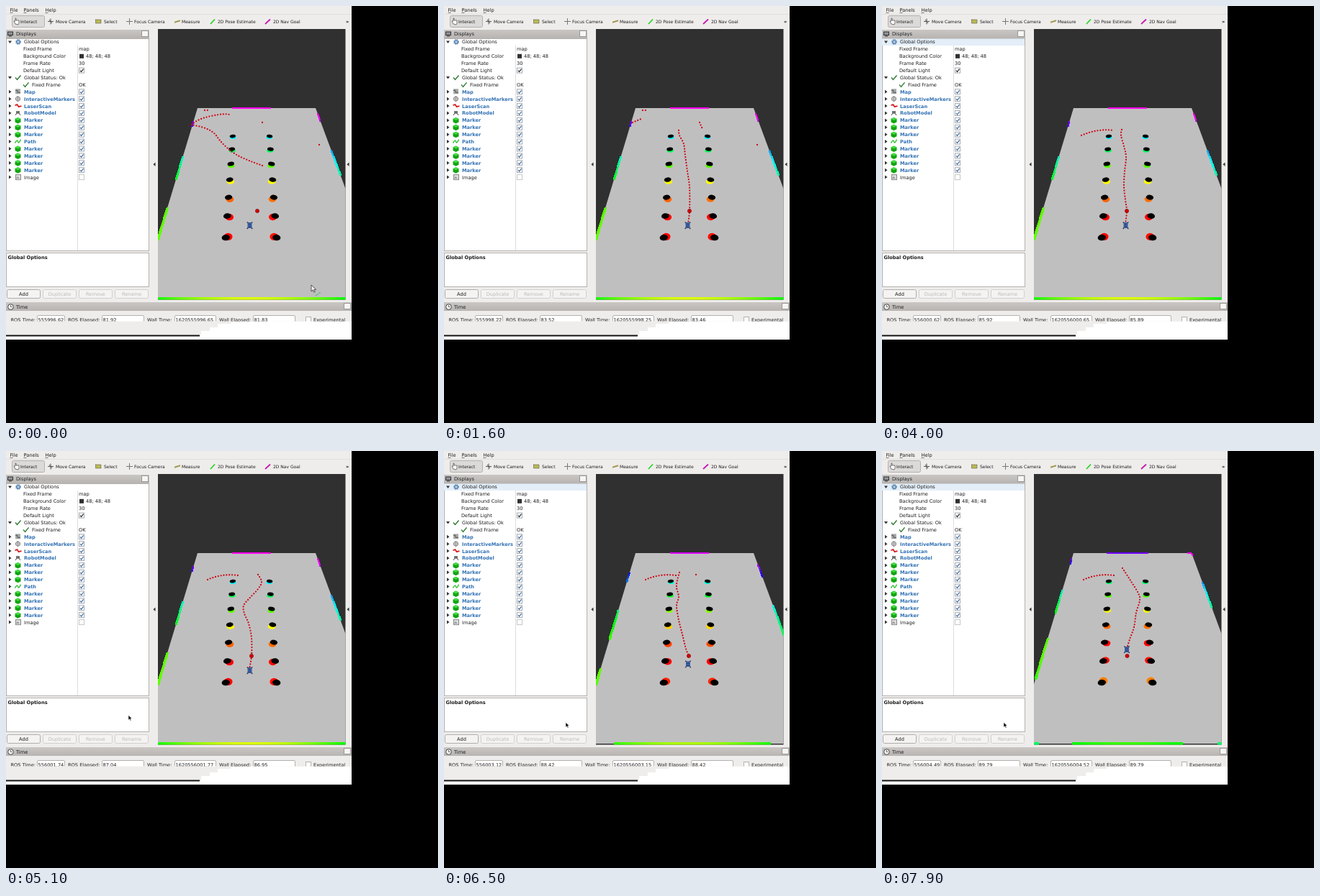
These frames come from a looping animation (600x580 px, 8000 ms). An HTML page:

```html
<!DOCTYPE html>
<html lang="en">
<head>
<meta charset="utf-8">
<title>Path planner view</title>
<style>
html, body { margin: 0; width: 100%; height: 100%; overflow: hidden; background: #000; }
svg { display: block; }
text { font: 6.64px "DejaVu Sans", sans-serif; white-space: pre; }
.bold { font-weight: bold; }
.tool { font-size: 6px; }
</style>
</head>
<body>
<svg id="stage" width="600" height="580" viewBox="0 0 600 580">
  <defs>
    <clipPath id="viewClip"><rect x="211" y="32" width="260.5" height="376.5"/></clipPath>
    <clipPath id="timeClip"><rect x="0" y="424" width="480" height="14.8"/></clipPath>
    <linearGradient id="header" x2="0" y2="1"><stop stop-color="#c9c6c4"/><stop offset="1" stop-color="#b7b4b2"/></linearGradient>
  </defs>
  <rect width="480" height="464" fill="#efedeb"/>
  <g id="chrome"></g>
  <g clip-path="url(#viewClip)">
    <rect x="211" y="32" width="261" height="377" fill="#303030"/>
    <path d="M266 142H430L528 407H186Z" fill="#c0bfc0"/>
    <g id="scan" shape-rendering="crispEdges"></g>
    <g id="cones"></g>
    <g fill="none" stroke="#cc0814" stroke-width="2.3" stroke-linecap="round" stroke-dasharray="0 3.9">
      <path id="stale"/><path id="route"/>
    </g>
    <circle id="goal" cy="285" r="2.6" fill="#d40000" stroke="#7a0808" stroke-width=".6"/>
    <g id="robot">
      <path d="M-3.8-4.6L-2-3H2L3.8-4.6M-3.8 5L-2 3H2L3.8 5" fill="none" stroke="#26364f" stroke-width="1.3"/>
      <rect x="-3" y="-3.6" width="6" height="7.4" rx="1" fill="#3d62a5"/>
      <path d="M-2-1H2M-2 2H2" stroke="#253c6b" stroke-width=".9"/>
    </g>
    <path id="glint" d="M430 403L437 398" stroke="#35c878" stroke-width="1.5" stroke-dasharray="2 1"/>
  </g>
  <path id="cursor" d="M0 0V9L2.2 7L3.7 10.2L5.2 9.5L3.7 6.4H6.6Z" stroke-width=".7"/>
</svg>
<script>
const LOOP = 8000, STEP = 100;
const $ = id => document.getElementById(id);
const chrome = $('chrome');

function el(tag, attrs, parent = chrome) {
  const node = document.createElementNS('http://www.w3.org/2000/svg', tag);
  for (const key in attrs) node.setAttribute(key, attrs[key]);
  return parent.appendChild(node);
}
const rect = (x, y, width, height, fill, more, parent) => el('rect', { x, y, width, height, fill, ...more }, parent);
const path = (d, more) => el('path', { d, fill: 'none', ...more });
function text(x, y, content, more, parent) {
  const node = el('text', { x, y, fill: '#1c1c1c', ...more }, parent);
  node.textContent = content;
  return node;
}
const frame = (x, y, w, h, fill = '#fff', stroke = '#b4b1af', rx = 0) =>
  rect(x + .5, y + .5, w - 1, h - 1, fill, { stroke, rx });

// Menu and toolbar
[['File', 5.5], ['Panels', 24.5], ['Help', 54.5]].forEach(([name, x]) => {
  text(x, 7.8, name);
  rect(x, 9, 4, .6, '#333');
});
rect(0, 11, 480, .7, '#dbd9d7');
frame(8, 13, 46, 17, '#dcdad8', '#b3b0ae', 2);
path('M13 25L11 21L13 21V17H14V20H18V24L17 26Z', { fill: '#fff', stroke: '#555', 'stroke-width': .8 });
path('M58 21.5H66M62 17.5V25.5M60 19L64 24', { stroke: '#555' });
rect(124.5, 19, 7.5, 5, '#b9bb4f', { stroke: '#444', 'stroke-dasharray': '1 1' });
path('M167 21.5H176M171.5 17V26', { stroke: '#777' });
path('M234 22.8L242 20.2', { stroke: '#a39a55', 'stroke-width': 2 });
path('M284 25L290 18.5', { stroke: '#25d625', 'stroke-width': 1.8 });
path('M360 25L367 18.5', { stroke: '#c41cb0', 'stroke-width': 1.8 });
[['Interact', 20], ['Move Camera', 69], ['Select', 136], ['Focus Camera', 178], ['Measure', 244],
 ['2D Pose Estimate', 294], ['2D Nav Goal', 371]].forEach(([name, x]) => text(x, 23.9, name, { class: 'tool' }));
text(472, 24, '»', { class: 'bold' });

// Displays panel
rect(0, 33, 199, 12, 'url(#header)');
rect(2, 35.5, 8, 5.5, '#333');
rect(3, 36.5, 6, 3.5, '#8d9298');
rect(4, 41.5, 4, 1, '#333');
text(14, 41.4, 'Displays');
frame(188, 34, 10, 9, '#f7f6f5', '#9a9896');
frame(0, 45, 199, 296);
const hover = rect(0, 45.5, 198, 9.5, '#e3eef8');
rect(99, 55, .8, 285, '#d4d4d4');

const twist = (y, open) => path(open ? `M3 ${y - 1.5}H8L5.5 ${y + 2}Z` : `M4 ${y - 2.5}V${y + 2.5}L7.5 ${y}Z`, { fill: '#333' });
const tick = (x, y) => path(`M${x} ${y}l2.5 3l5-6`, { stroke: '#2d7a2d', 'stroke-width': 1.4 });
function checkbox(y, on, color = '#3a6596') {
  frame(101, y - 4, 8, 8, '#fff', on ? '#a3abb4' : '#c6c6c6');
  if (on) path(`M103 ${y}l1.5 2l3-4`, { stroke: color, 'stroke-width': 1.1 });
}
const icons = {
  Map: y => { rect(13, y - 4, 7, 7, '#a6aaa8'); path(`M13 ${y - 2}h3v3h4`, { stroke: '#555' }); },
  InteractiveMarkers: y => { el('circle', { cx: 16.5, cy: y, r: 3, fill: 'none', stroke: '#666' }); path(`M13 ${y}h7M16.5 ${y - 4}v8`, { stroke: '#888' }); },
  LaserScan: y => path(`M12.5 ${y - 1}l3-1l2 3l4-1`, { stroke: '#d82020', 'stroke-width': 1.8 }),
  RobotModel: y => { rect(14, y - 3, 5, 3, '#777'); path(`M13 ${y + 3}l2-3h3l2 3`, { stroke: '#444' }); },
  Marker: y => {
    path(`M12.5 ${y - 2}l4-2l4 2v4.5l-4 2l-4-2Z`, { fill: '#12a512' });
    path(`M12.5 ${y - 2}l4-2l4 2l-4 2Z`, { fill: '#46dc46' });
  },
  Path: y => path(`M12.5 ${y + 2}q3-6 4-2t4-3`, { stroke: '#3fc43f', 'stroke-width': 1.5 }),
  Image: y => { frame(13, y - 4, 8, 8, '#ddd', '#888'); path(`M14 ${y + 2}l2-3l3 3Z`, { fill: '#999' }); }
};
const rowY = i => 50 + i * 9.9;
const label = (x, row, content, more) => text(x, rowY(row) + 2.4, content, more);
twist(rowY(0), true);
el('circle', { cx: 17, cy: rowY(0), r: 2.4, fill: '#b5cbe2', stroke: '#5b86b3', 'stroke-width': 1.4 });
el('circle', { cx: 17, cy: rowY(0), r: 3.5, fill: 'none', stroke: '#5b86b3', 'stroke-dasharray': '1.4 1.4' });
label(25, 0, 'Global Options');
[['Fixed Frame', 'map'], ['Background Color', '48; 48; 48'], ['Frame Rate', '30'], ['Default Light', '']].forEach(([name, value], i) => {
  label(24, i + 1, name);
  label(i === 1 ? 111 : 101, i + 1, value);
});
rect(102, rowY(2) - 3, 6, 6, '#303030');
checkbox(rowY(4), true, '#222');
twist(rowY(5), true);
tick(13, rowY(5));
label(25, 5, 'Global Status: Ok');
tick(24, rowY(6));
label(36, 6, 'Fixed Frame');
label(101, 6, 'OK');
['Map', 'InteractiveMarkers', 'LaserScan', 'RobotModel', 'Marker', 'Marker', 'Marker', 'Path',
 'Marker', 'Marker', 'Marker', 'Marker', 'Image'].forEach((name, i) => {
  const on = name !== 'Image', y = rowY(i + 7);
  twist(y, false);
  icons[name](y);
  label(25, i + 7, name, on ? { class: 'bold', fill: '#3373b4' } : {});
  checkbox(y, on);
});

frame(0, 343, 199, 48);
text(2.5, 352, 'Global Options', { class: 'bold' });
['Add', 'Duplicate', 'Remove', 'Rename'].forEach((name, i) => {
  frame(1 + i * 50, 394, 47, 13, '#f4f3f2', i ? '#d2d0ce' : '#b0aeac', 2);
  text(24.5 + i * 50, 402.6, name, { 'text-anchor': 'middle', fill: i ? '#bcbab8' : '#1c1c1c' });
});
[206, 475].forEach(x => path(`M${x + 1.5} 217.5V223L${x - 1.5} 220.2Z`, { fill: '#333' }));

// Time panel
rect(0, 412, 480, 12, 'url(#header)');
el('circle', { cx: 6.5, cy: 418.5, r: 3.8, fill: '#f5f5f5', stroke: '#444' });
path('M6.5 416V418.5H8.5', { stroke: '#444', 'stroke-width': .8 });
text(14, 421, 'Time');
frame(469, 413, 10, 9, '#f7f6f5', '#9a9896');
const timeBox = el('g', { 'clip-path': 'url(#timeClip)' });
const readout = [['ROS Time:', 6.5, 43, 39], ['ROS Elapsed:', 86, 133, 59], ['Wall Time:', 196, 234, 58], ['Wall Elapsed:', 296, 343, 59]]
  .map(([name, x, fieldX, width]) => {
    text(x, 439.3, name, {}, timeBox);
    rect(fieldX + .5, 430.5, width - 1, 12, '#fff', { stroke: '#b4b1af', rx: 1.5 }, timeBox);
    return text(fieldX + 1.5, 439.2, '', {}, timeBox);
  });
rect(416.5, 432.5, 7, 8, '#fff', { stroke: '#b4b1af' }, timeBox);
text(427, 439.3, 'Experimental', {}, timeBox);
rect(0, 438.8, 480, 25.2, '#fff');
path('M0 438.8H312V442H294V447H283V452H271V457.5H0Z', { fill: '#efedeb' });
path('M0 458.6H269', { stroke: '#111', 'stroke-width': 2 });

// Ground plane: screen rays meet at VX, VY; depth is measured in cone rows
const VX = 339.5, VY = -103, ROW = .000195, LANE = .0926, RADIUS = .18;
const toWorld = (x, y) => ({ x: (x - VX) / (y - VY) / LANE, z: 1 / (y - VY) / ROW });
const distance = (a, b) => Math.hypot(a.x - b.x, a.z - b.z);
const rainbow = d => `hsl(${Math.min(305, Math.max(0, 40 * (d - .8)))} 100% 50%)`;
const between = (a, b, p) => a + (b - a) * p;

const cones = [];
[181.5, 199.5, 220, 242, 266.5, 292.5, 322.5].forEach((y, i) => {
  [-.0862 + .001 * i, .0933 - .0014 * i].forEach(lane => {
    const x = VX + lane * (y - VY), rx = 4.2 + i * .25, ry = 2.3 + i * .3;
    const tilt = `rotate(${lane < 0 ? -8 : 8} ${x} ${y})`;
    const glow = el('ellipse', { rx: rx + .3, ry: ry + i * .17 }, $('cones'));
    el('ellipse', { cx: x, cy: y - .4, rx, ry, fill: '#000', transform: tilt }, $('cones'));
    cones.push({ x, y, reach: 1.2 + i * .4, glow, world: toWorld(x, y) });
  });
});

const hits = [];
function addHit(x, y, w, h) {
  hits.push({ node: rect(x - w / 2, y - h / 2, w, h, 'none', {}, $('scan')), world: toWorld(x, y) });
}
for (let x = 267; x < 430; x += 2) addHit(x, 142, 2.4, 2);
for (let y = 143; y < 326; y += 1.5) {
  const size = 1.8 + (y - 142) / 90;
  addHit(266 - .3005 * (y - 142), y, size, 2.6);
  if (y < 256) addHit(430 + .37 * (y - 142), y, size, 2.6);
}
for (let x = 211; x < 473; x += 2) addHit(x, 406.5, 2.4, 4);

function blocked(from, to) {
  const dx = to.x - from.x, dz = to.z - from.z, length = Math.hypot(dx, dz);
  return cones.some(({ world }) => {
    const cx = world.x - from.x, cz = world.z - from.z;
    const along = (cx * dx + cz * dz) / length;
    return along > 0 && along < length && Math.abs(cx * dz - cz * dx) / length < RADIUS;
  });
}

// Routes: planned path, leftover traces and look-ahead point
const arc = 'M280 179Q300 170 322 173';
const spare = 'M435 193h.1M276 145h4';
const plans = [
  { from: 0, goal: 349, stale: spare + 'M356 162h.1M258 165Q266 157 285 153T310 151',
    route: [356, 222, 340, 216, 322, 208, 308, 198, 297, 187, 289, 177, 277, 170, 258, 165] },
  { from: 800, goal: 341, stale: spare + 'M262 162L274 157M355 162L359 171',
    route: [326, 173, 327, 180, 333, 192, 335, 208, 338, 230, 341, 252, 341, 285, 339, 303] },
  { from: 2300, goal: 341, stale: '',
    route: [322, 173, 300, 173, 285, 176, 273, 181, 265, 189, 262, 200, 268, 213, 281, 228, 295, 240, 308, 248, 317, 258, 327, 275, 338, 303] },
  { from: 3500, goal: 340, stale: 'M277 180Q300 170 322 173',
    route: [333, 172, 332, 180, 336, 195, 339, 210, 337, 230, 336, 250, 338, 270, 340, 285, 338, 303] },
  { from: 4500, goal: 341, stale: arc,
    route: [350, 172, 355, 182, 350, 192, 338, 205, 330, 215, 331, 226, 337, 240, 341, 260, 341, 285, 338, 303] },
  { from: 5800, goal: 340, stale: arc + 'M350 172h.1',
    route: [327, 169, 324, 180, 323, 190, 326, 203, 323, 215, 326, 235, 331, 255, 336, 275, 340, 285] },
  { from: 7200, goal: 340.5, stale: arc,
    route: [334, 163, 345, 180, 356, 198, 358, 208, 353, 225, 350, 245, 344, 262, 340, 275] }
];
function smooth(list) {
  const n = list.length / 2;
  const at = i => { const k = 2 * Math.min(n - 1, Math.max(0, i)); return [list[k], list[k + 1]]; };
  let d = 'M' + at(0);
  for (let i = 0; i < n - 1; i++) {
    const [a, b, c, e] = [at(i - 1), at(i), at(i + 1), at(i + 2)];
    d += `C${b.map((v, k) => v + (c[k] - a[k]) / 6)} ${c.map((v, k) => v - (e[k] - b[k]) / 6)} ${c}`;
  }
  return d;
}

// Keys are [time, value]
function track(keys, t) {
  const i = Math.max(1, keys.findIndex(k => k[0] >= t));
  const [a, b] = [keys[i - 1], keys[i]];
  return between(a[1], b[1], (t - a[0]) / (b[0] - a[0]));
}
const clock = [[0, 0], [1600, 1.6], [3000, 3.02], [4000, 4], [5100, 5.12], [6500, 6.5], [8000, 7.97]];
const wallLag = [[0, -.09], [1600, -.06], [3000, 0], [4000, -.03], [5100, -.09], [6500, 0], [8000, 0]];

function robotY(t) {
  const s = Math.max(0, t / 1000 - 5.5), speed = 14.5, ramp = .8;
  return 305 - (s < ramp ? speed * s * s / (2 * ramp) : speed * (s - ramp / 2));
}

function cursorAt(t) {
  if (t < 900) return [424, 388];
  if (t >= 2800 && t < 3300) return [225, 357];
  if (t >= 4700) return t < 5700 ? [170, 367.5] : [169, 377.5];
  return null;
}

function draw(t) {
  const y = robotY(t), x = between(338.5, 340, (305 - y) / 29), eye = toWorld(x, y);
  $('robot').setAttribute('transform', `translate(${x} ${y})`);
  for (const { node, world } of hits) {
    node.setAttribute('fill', blocked(eye, world) ? 'none' : rainbow(distance(world, eye)));
  }
  for (const cone of cones) {
    const dx = x - cone.x, dy = y - cone.y, k = cone.reach / Math.hypot(dx, dy);
    cone.glow.setAttribute('cx', cone.x + dx * k);
    cone.glow.setAttribute('cy', cone.y + dy * k);
    cone.glow.setAttribute('fill', rainbow(distance(cone.world, eye) - RADIUS));
  }
  const plan = plans.filter(p => p.from <= t).pop();
  $('route').setAttribute('d', smooth(plan.route));
  $('stale').setAttribute('d', plan.stale);
  $('goal').setAttribute('cx', plan.goal);

  const now = track(clock, t);
  const values = [555996.62 + now, 81.92 + now, 1620555996.65 + now, 81.92 + now + track(wallLag, t)];
  readout.forEach((node, i) => { node.textContent = values[i].toFixed(2); });

  hover.setAttribute('visibility', (t >= 3400 && t < 4400) || t >= 5900 ? 'visible' : 'hidden');
  const spot = cursorAt(t), cursor = $('cursor'), light = t < 900;
  cursor.setAttribute('visibility', spot ? 'visible' : 'hidden');
  $('glint').setAttribute('visibility', light ? 'visible' : 'hidden');
  if (spot) cursor.setAttribute('transform', `translate(${spot}) scale(${light ? 1 : .75})`);
  cursor.setAttribute('fill', light ? '#eee' : '#000');
  cursor.setAttribute('stroke', light ? '#222' : '#fff');
}

const start = performance.now();
let shown = -1;
function loop() {
  const t = Math.floor(((performance.now() - start) % LOOP) / STEP) * STEP;
  if (t !== shown) draw(shown = t);
  requestAnimationFrame(loop);
}
loop();
</script>
</body>
</html>
```
